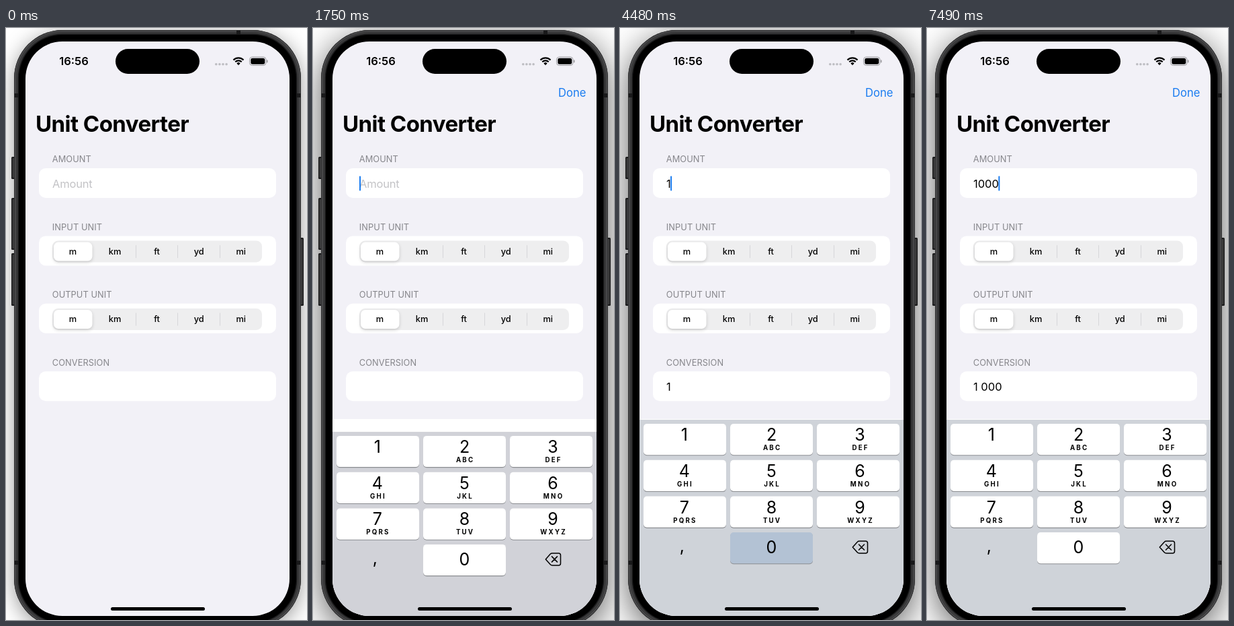
An HTML page with a canvas for the animation above (8 s loop, 448 by 878 pixels).

```html
<!DOCTYPE html>
<html lang="en">
<head>
<meta charset="utf-8">
<title>Unit Converter</title>
<style>
html, body { margin: 0; width: 100%; height: 100%; overflow: hidden; background: #fff; }
canvas { display: block; width: 448px; height: 878px; }
</style>
</head>
<body>
<canvas id="stage"></canvas>
<script>
const W = 448, H = 878, LOOP = 8000, STEP = 70;
const canvas = document.getElementById('stage');
const ctx = canvas.getContext('2d');
const dpr = window.devicePixelRatio || 1;
canvas.width = W * dpr;
canvas.height = H * dpr;

const SCREEN = { x: 29, y: 20, w: 393, h: 852, r: 55 };
const BLUE = '#1a7cf0';
const UNITS = ['m', 'km', 'ft', 'yd', 'mi'];
const LETTERS = ['', 'ABC', 'DEF', 'GHI', 'JKL', 'MNO', 'PQRS', 'TUV', 'WXYZ'];
const KEY_X = [35, 164, 293];
const LABEL_X = [95.8, 225.5, 357];

// digit, key down, key up, result shown
const PRESSES = [
  ['1', 3710, 3850, 3850],
  ['0', 4480, 4620, 4620],
  ['0', 4830, 5040, 5110],
  ['0', 5740, 5880, 5950]
];
// caret fade out, its length, fade in, its length
const BLINKS = [
  [2520, 210, 2940, 210],
  [3570, 210, 3850, 70],
  [7000, 140, 7350, 210]
];

const clamp = v => Math.max(0, Math.min(1, v));
const ramp = (t, start, len) => clamp((t - start + STEP) / len);
const mix = (a, b, k) => Math.round(a + (b - a) * k);

function roundRect(x, y, w, h, r) {
  ctx.beginPath();
  ctx.roundRect(x, y, w, h, r);
}

function box(x, y, w, h, r, color) {
  roundRect(x, y, w, h, r);
  ctx.fillStyle = color;
  ctx.fill();
}

function shadow(color, blur, dy) {
  ctx.shadowColor = color;
  ctx.shadowBlur = blur * dpr;
  ctx.shadowOffsetY = dy * dpr;
}

function font(size, weight = 400, spacing = 0) {
  ctx.font = `${weight} ${size}px Inter, "Liberation Sans", sans-serif`;
  ctx.letterSpacing = spacing + 'px';
}

function text(str, x, y, color = '#000', align = 'left') {
  ctx.textAlign = align;
  ctx.fillStyle = color;
  ctx.fillText(str, x, y);
}

function drawBody(t) {
  ctx.fillStyle = '#fff';
  ctx.fillRect(0, 0, W, H);

  ctx.save();
  if (t < 1260) shadow('rgba(0,0,0,.4)', 30, 6);
  else shadow('rgba(0,0,0,.62)', 50, 12);
  box(12, 3, 427, 886, 72, '#2a2a2b');
  ctx.restore();

  for (const [y, h] of [[191, 33], [252, 77], [334, 78]]) {
    box(8, y, 6, h, 1.5, '#1c1c1d');
    box(9.5, y + 2, 3, h - 4, 1, '#3d3d3e');
  }
  box(437, 311, 6, 101, 1.5, '#1c1c1d');
  box(438.5, 313, 3, 97, 1, '#3d3d3e');

  const layers = [[0, '#29292a'], [1, '#58585a'], [2, '#3a3a3b'], [5.5, '#1d1d1e']];
  for (const [d, color] of layers)
    box(12 + d, 3 + d, 427 - 2 * d, 886 - 2 * d, 72 - d, color);

  ctx.fillStyle = '#19191a';
  for (const y of [97, 790]) {
    ctx.fillRect(13, y, 6, 6);
    ctx.fillRect(432, y, 6, 6);
  }
  ctx.fillRect(343, 4, 6, 6);

  box(19, 10, 413, 872, 65, '#000');
}

function drawStatus() {
  font(16.6, 600);
  text('16:56', 101, 55.3, '#000', 'center');
  box(163, 31, 125, 37, 18.5, '#000');

  ctx.fillStyle = '#bdbdc2';
  for (let i = 0; i < 4; i++) {
    ctx.beginPath();
    ctx.arc(312.8 + i * 5.1, 53.8, 1.8, 0, 7);
    ctx.fill();
  }

  const a0 = -Math.PI * 0.75, a1 = -Math.PI * 0.25;
  ctx.strokeStyle = ctx.fillStyle = '#000';
  for (const [r, w] of [[10.6, 2.4], [6.7, 2.3]]) {
    ctx.lineWidth = w;
    ctx.beginPath();
    ctx.arc(346, 55, r, a0, a1);
    ctx.stroke();
  }
  ctx.beginPath();
  ctx.moveTo(346, 55.3);
  ctx.arc(346, 55, 3.7, a0, a1);
  ctx.fill();

  ctx.lineWidth = 1;
  ctx.strokeStyle = '#9b9b9f';
  roundRect(362.5, 43, 24.5, 12.5, 4);
  ctx.stroke();
  box(364.3, 44.8, 21, 9, 2.4, '#000');
  box(388, 47.2, 1.5, 4.2, 1, '#9b9b9f');
}

function drawSegments(y) {
  box(69, y, 312, 32, 8.5, '#eeeeef');
  ctx.fillStyle = '#d6d6d9';
  for (const x of [193, 255, 318]) ctx.fillRect(x, y + 6.5, 1, 19);
  ctx.save();
  shadow('rgba(0,0,0,.17)', 5, 2);
  box(71, y + 2, 57.5, 28, 7, '#fff');
  ctx.restore();
  font(12.8, 500);
  UNITS.forEach((u, i) => text(u, 99.4 + i * 62.6, y + 20.3, '#000', 'center'));
}

function formatted(str) {
  return str.replace(/\B(?=(\d{3})+$)/g, ' ');
}

function drawForm(t) {
  font(33, 700, -0.55);
  text('Unit Converter', 44, 153.7);

  font(12.8, 400, 0.08);
  ['AMOUNT', 'INPUT UNIT', 'OUTPUT UNIT', 'CONVERSION'].forEach((label, i) => {
    const y = 208 + i * 100.4;
    text(label, 68.8, y - 8.7, '#86868b');
    box(49, y, 353, 44, 10, '#fff');
  });
  drawSegments(315.6);
  drawSegments(416);

  const amount = PRESSES.filter(p => t >= p[2]).map(p => p[0]).join('');
  const result = PRESSES.filter(p => t >= p[3]).map(p => p[0]).join('');
  if (amount) {
    font(16.5);
    text(amount, 69, 237);
  } else {
    font(16.5, 400, -0.2);
    text('Amount', 69, 237, '#c3c3c6');
  }
  if (result) {
    font(16.5);
    ctx.globalAlpha = t < 3920 ? 0.5 : t < 4060 ? 0.93 : 1;
    text(formatted(result), 69, 538);
    ctx.globalAlpha = 1;
  }

  if (t >= 1470) {
    let caret = 1;
    for (const [out, outLen, back, backLen] of BLINKS)
      caret += ramp(t, back, backLen) - ramp(t, out, outLen);
    font(16.5);
    const x = amount ? 68.4 + ctx.measureText(amount).width : 69;
    ctx.globalAlpha = clamp(caret);
    box(x, 219.5, 2, 22, 1, BLUE);

    ctx.globalAlpha = ramp(t, 1470, 210);
    font(16.6);
    text('Done', 406.5, 102.2, BLUE, 'right');
    ctx.globalAlpha = 1;
  }
}

function drawKey(x, y, down) {
  box(x, y + 1, 123, 46.3, 5, '#8b8d91');
  box(x, y, 123, 46.2, 5, down ? '#b3c2d4' : '#fff');
}

function drawBackspace(x, y) {
  ctx.strokeStyle = '#000';
  ctx.lineWidth = 1.5;
  ctx.lineCap = ctx.lineJoin = 'round';
  ctx.beginPath();
  ctx.moveTo(x - 11, y);
  ctx.lineTo(x - 4, y - 7.8);
  ctx.quadraticCurveTo(x - 3, y - 9, x - 1, y - 9);
  ctx.arcTo(x + 11.2, y - 9, x + 11.2, y, 3);
  ctx.arcTo(x + 11.2, y + 9, x, y + 9, 3);
  ctx.lineTo(x - 1, y + 9);
  ctx.quadraticCurveTo(x - 3, y + 9, x - 4, y + 7.8);
  ctx.closePath();
  ctx.moveTo(x - 1.8, y - 4);
  ctx.lineTo(x + 6.2, y + 4);
  ctx.moveTo(x + 6.2, y - 4);
  ctx.lineTo(x - 1.8, y + 4);
  ctx.stroke();
}

function drawKeyboard(t) {
  if (t < 1540) return;
  const s = 18.26 * (t - 1504) / 1000;
  const drop = t < 2030 ? 291 * (1 + s) * Math.exp(-s) : 0;
  const press = PRESSES.find(p => t >= p[1] && t < p[2]);
  const held = press && press[0];
  const k = clamp((t - 1750) / 280);

  ctx.fillStyle = '#fff';
  ctx.fillRect(29, 580, 393, 292);
  ctx.save();
  ctx.translate(0, drop);
  ctx.fillStyle = `rgb(${mix(209, 207, k)},${mix(210, 211, k)},${mix(216, 217, k)})`;
  ctx.fillRect(29, 581, 393, 300);

  LETTERS.forEach((letters, i) => {
    const col = i % 3, y = 587 + Math.floor(i / 3) * 53.8;
    const digit = String(i + 1);
    drawKey(KEY_X[col], y, held === digit);
    font(25);
    text(digit, LABEL_X[col], y + 25, '#000', 'center');
    font(9.7, 700, 2.2);
    text(letters, LABEL_X[col] + 1.1, y + 39, '#000', 'center');
  });
  drawKey(KEY_X[1], 748, held === '0');
  font(25);
  text('0', LABEL_X[1], 779, '#000', 'center');
  text(',', 92.3, 777, '#000', 'center');
  drawBackspace(357.3, 770);
  ctx.restore();
}

function draw(t) {
  ctx.setTransform(dpr, 0, 0, dpr, 0, 0);
  drawBody(t);
  ctx.save();
  roundRect(SCREEN.x, SCREEN.y, SCREEN.w, SCREEN.h, SCREEN.r);
  ctx.clip();
  ctx.fillStyle = '#f2f1f7';
  ctx.fillRect(SCREEN.x, SCREEN.y, SCREEN.w, SCREEN.h);
  drawStatus();
  drawForm(t);
  drawKeyboard(t);
  box(156, 859, 140, 5, 2.5, '#000');
  ctx.restore();
}

const start = performance.now();
function frame() {
  const t = (performance.now() - start) % LOOP;
  draw(Math.floor(t / STEP) * STEP);
  requestAnimationFrame(frame);
}
frame();
</script>
</body>
</html>
```
